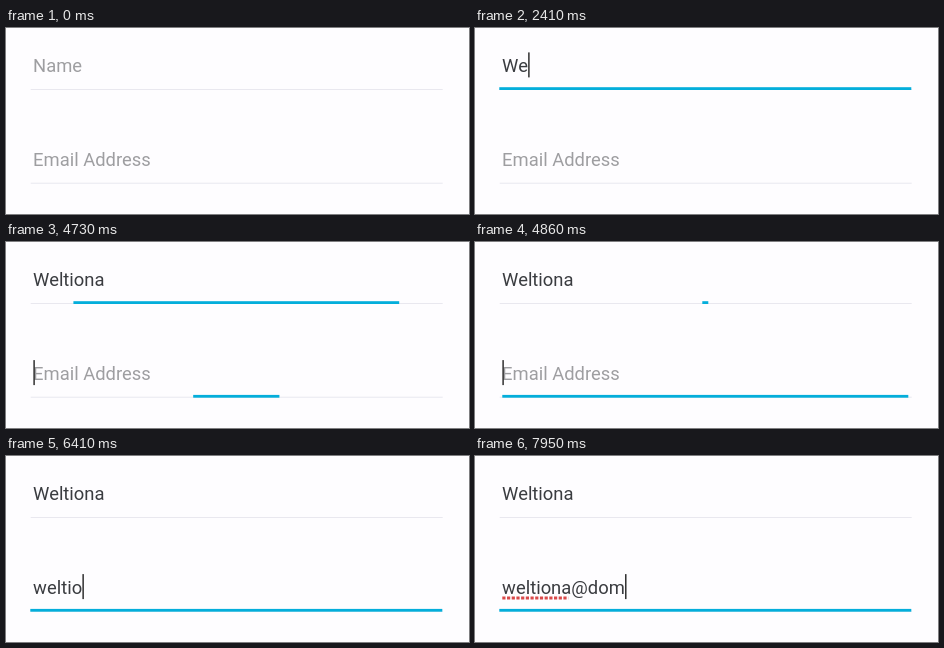
Animation of 463 by 186 pixels, one loop 8 s. Source, as an HTML page:

```html
<!DOCTYPE html>
<html lang="en">
<head>
<meta charset="utf-8">
<title>Form fields</title>
<style>
  html, body { margin: 0; width: 100%; height: 100%; overflow: hidden; background: #fefdff; }
  svg { display: block; width: 463px; height: 186px; }
  text { font: 18.4px Roboto, "Noto Sans", sans-serif; }
  .hint { fill: #9e9ea1; }
  .value { fill: #3a3c40; }
  .rule { fill: #e9e8ef; }
  .focus { fill: #04aedb; }
  .caret { fill: #222; }
  .spelling { stroke: #d94a4a; stroke-width: 3; stroke-dasharray: 3.2 1.5; }
</style>
</head>
<body>
<svg id="stage" viewBox="0 0 463 186"></svg>
<script>
const LOOP = 8000;
const STEP = 1000 / 22;
const LEFT = 27.1;
const LINE = { center: 230.3, half: 206 };
const TRANSITION = 200;
const stage = document.getElementById("stage");

function add(tag, className, attributes, content = "") {
  const node = document.createElementNS("http://www.w3.org/2000/svg", tag);
  node.setAttribute("class", className);
  set(node, attributes);
  node.textContent = content;
  stage.append(node);
  return node;
}

function set(node, attributes) {
  for (const [key, value] of Object.entries(attributes)) node.setAttribute(key, value);
}

function show(node, visible) {
  node.setAttribute("visibility", visible ? "visible" : "hidden");
}

// The CSS "ease" curve, cubic-bezier(.25, .1, .25, 1).
function ease(x) {
  if (x <= 0) return 0;
  if (x >= 1) return 1;
  const bezier = (u, a, b) => 3 * u * (1 - u) ** 2 * a + 3 * u * u * (1 - u) * b + u ** 3;
  let low = 0, high = 1;
  for (let i = 0; i < 24; i++) {
    const middle = (low + high) / 2;
    if (bezier(middle, 0.25, 0.25) < x) low = middle; else high = middle;
  }
  return bezier(low, 0.1, 1);
}

function createField(options) {
  const { top, label } = options;
  const baseline = top + 44;
  return {
    ...options,
    rule: add("rect", "rule", { x: 24.7, y: top + 61, width: 412, height: 1 }),
    focus: add("rect", "focus", { y: top + 59.2, height: 2.8 }),
    hint: add("text", "hint", { x: LEFT, y: baseline }, label),
    value: add("text", "value", { x: LEFT, y: baseline }),
    caret: add("rect", "caret", { y: top + 24.4, width: 1.4, height: 25 })
  };
}

// caretOn holds the [from, to] spans in which the caret is lit.
const fields = [
  createField({
    top: 0, label: "Name", text: "Weltiona",
    keys: [2180, 2410, 2500, 2680, 2910, 3140, 3500, 3730],
    focusAt: 1174, blurAt: 4695,
    caretOn: [[1180, 1860], [2180, 4270]]
  }),
  createField({
    top: 93.7, label: "Email Address", text: "weltiona@dom",
    keys: [5550, 5680, 5820, 6000, 6180, 6410, 6550, 6730, 7410, 7640, 7820, 7950],
    focusAt: 4695, blurAt: Infinity,
    caretOn: [[4680, 5410], [5550, 7230], [7410, LOOP]]
  })
];
const spelling = add("line", "spelling", { x1: 27.3, x2: 93.3, y1: 141.9, y2: 141.9 });

function drawField(field, time, stepTime) {
  const typed = field.text.slice(0, field.keys.filter(key => time >= key).length);
  if (field.value.textContent !== typed) field.value.textContent = typed;
  show(field.hint, !typed);

  const progress = ease((stepTime - field.focusAt) / TRANSITION)
    - ease((stepTime - field.blurAt) / TRANSITION);
  const half = LINE.half * progress;
  set(field.focus, { x: LINE.center - half, width: 2 * half });

  const width = typed ? field.value.getComputedTextLength() : 0;
  set(field.caret, { x: LEFT + width + 0.3 });
  show(field.caret, field.caretOn.some(([from, to]) => time >= from && time < to));
}

function draw(time) {
  const stepTime = Math.floor((time + 5) / STEP) * STEP;
  fields.forEach(field => drawField(field, time, stepTime));
  show(spelling, time >= 7410);
}

const start = performance.now();
function tick() {
  draw((performance.now() - start) % LOOP);
  requestAnimationFrame(tick);
}
tick();
</script>
</body>
</html>
```
